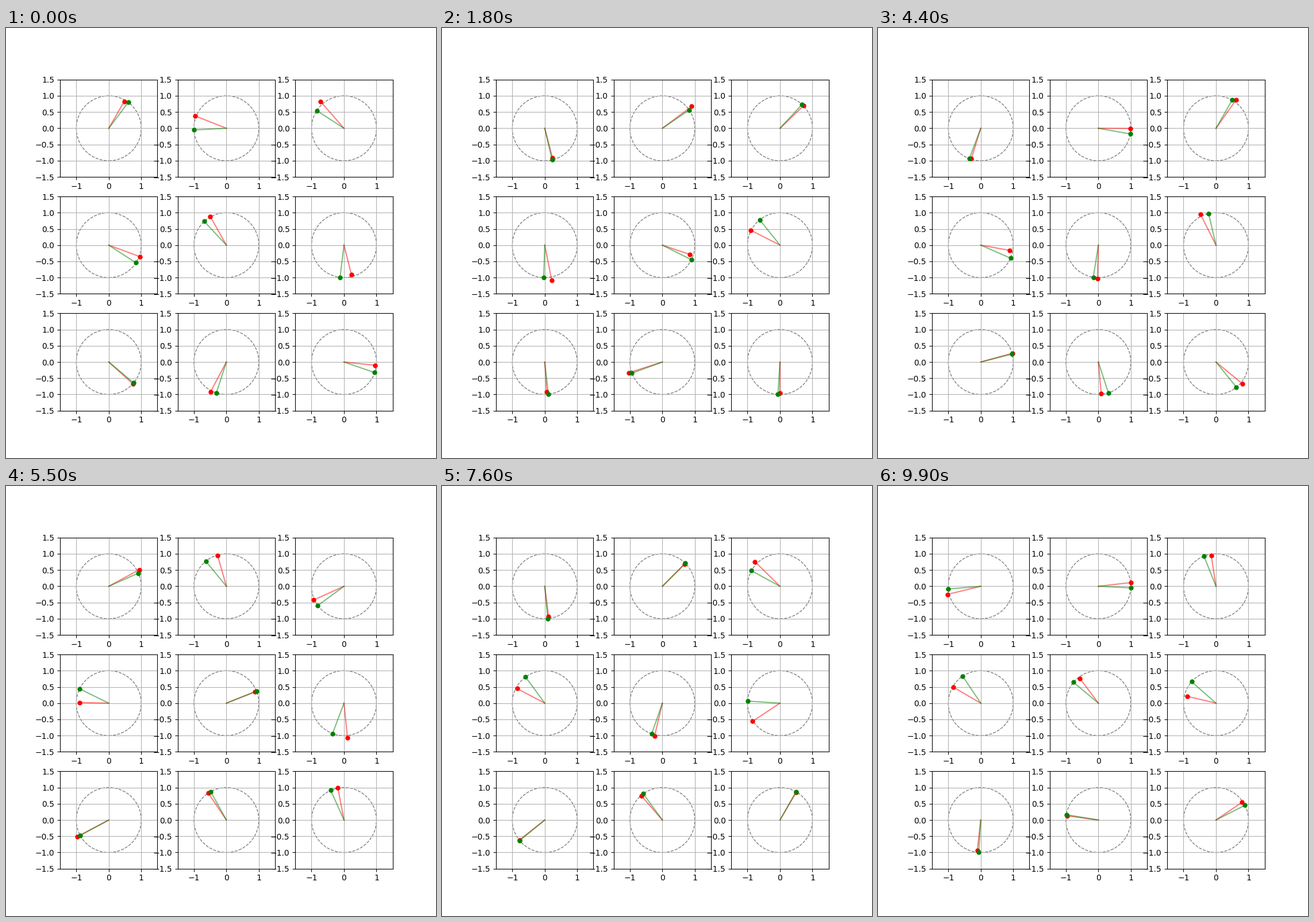
A matplotlib script for the animation above (10000 ms loop, 748 by 748 pixels).

```python
import numpy as np
import matplotlib.pyplot as plt
from matplotlib.animation import FuncAnimation
from matplotlib.lines import Line2D
from matplotlib.patches import Circle

FRAMES = 100
INTERVAL = 100

# Per panel, in degrees: start angle, turn per frame and mid-loop bend of the
# green hand, then mean lead, lead swing and swing direction of the red one
PANELS = [
    (53, 12.24, 18, 6, 5, 130),
    (183, 12.67, -31, -8, 18, -20),
    (147, 14.19, 9, -7, 9, -20),
    (-33, 16.13, 20, 19, 7, 120),
    (133, 10.98, 5, -2, 12, -60),
    (263, 13.29, -25, 13, 25, 192),
    (-40, 17.64, -2, 1, 4, 100),
    (252, 17.36, -8, -4, 9, 120),
    (-19, 15.01, 28, -2, 15, -25),
]

rng = np.random.default_rng(4)
steps = np.arange(FRAMES)


def slow_noise(size, window=9):
    noise = rng.normal(0, size, FRAMES + window - 1)
    return np.convolve(noise, np.ones(window), "valid") / np.sqrt(window)


def hand_paths(start, rate, bend, lead, swing, toward):
    """Complex tip positions of the green hand and of its red estimate."""
    angle = start + rate * steps + bend * np.sin(np.pi * steps / (FRAMES - 1))
    lead = lead + swing * np.cos(np.radians(angle - toward))
    green = np.exp(1j * np.radians(angle))
    red = (1 + slow_noise(.06)) * np.exp(1j * np.radians(angle + lead))
    return green, red


fig, axes = plt.subplots(3, 3, figsize=(7.48, 7.48), dpi=100)
fig.subplots_adjust(left=.125, right=.9, bottom=.11, top=.88,
                    wspace=.2, hspace=.2)
for ax in axes.flat:
    ax.set(xlim=(-1.5, 1.5), ylim=(-1.5, 1.5), aspect="equal",
           xticks=[-1, 0, 1], yticks=np.arange(-1.5, 1.6, .5))
    ax.grid(True)
    ax.add_patch(Circle((0, 0), 1, fill=False, ec="gray", ls="--", lw=1))

# The panels never change, so render them once and reuse the picture
fig.canvas.draw()
backdrop = np.array(fig.canvas.buffer_rgba())
for ax in axes.flat:
    ax.set_visible(False)
fig.figimage(backdrop, origin="upper")


def add_hand(ax, color, path):
    rod = Line2D([], [], color=color, alpha=.5, transform=ax.transData)
    dot = Line2D([], [], color=color, marker="o", ms=5, ls="",
                 transform=ax.transData)
    fig.add_artist(rod)
    fig.add_artist(dot)
    return rod, dot, path


hands = []
for ax, params in zip(axes.flat, PANELS):
    green, red = hand_paths(*params)
    hands += [add_hand(ax, "red", red), add_hand(ax, "green", green)]


def update(i):
    for rod, dot, path in hands:
        x, y = path[i].real, path[i].imag
        rod.set_data([0, x], [0, y])
        dot.set_data([x], [y])
    return [part for rod, dot, _ in hands for part in (rod, dot)]


anim = FuncAnimation(fig, update, frames=FRAMES, interval=INTERVAL,
                     repeat=True, repeat_delay=0)
plt.show()
```
